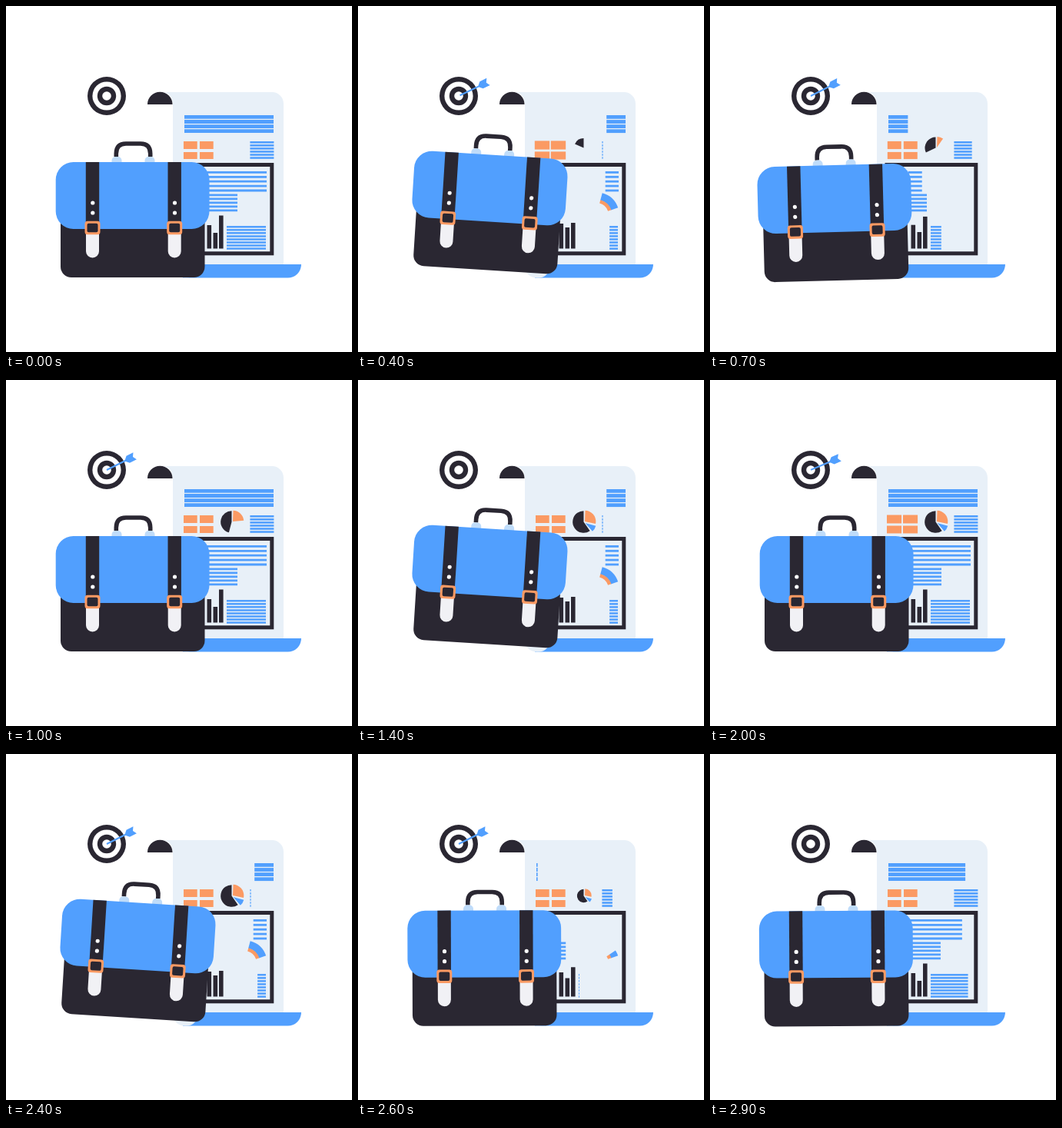
These frames come from a looping animation (450x450 px, 3 s). An HTML page with a canvas:

```html
<!DOCTYPE html>
<html lang="en">
<head>
<meta charset="utf-8">
<title>Briefcase and report</title>
<style>
  html, body { margin: 0; width: 100%; height: 100%; overflow: hidden; background: #fff; }
  canvas { display: block; }
</style>
</head>
<body>
<canvas id="stage" width="450" height="450"></canvas>
<script>
const ctx = document.getElementById('stage').getContext('2d');
const BLUE = '#519ffe', DARK = '#2a2732', PAPER = '#e8f0f8', ORANGE = '#fb9a63', WHITE = '#fff';
const LOOP = 3000, STEP = 100;

const rad = deg => deg * Math.PI / 180;
const mix = (a, b, k) => a + (b - a) * k;
const progress = (t, from, to) => Math.min(1, Math.max(0, (t - from) / (to - from)));
const ease = (t, from, to) => { const p = progress(t, from, to); return p * p * (3 - 2 * p); };

function fill(color, path) {
  ctx.fillStyle = color;
  ctx.fill(new Path2D(path));
}
function box(color, x, y, w, h, r = 0) {
  ctx.fillStyle = color;
  ctx.beginPath();
  ctx.roundRect(x, y, w, h, r);
  ctx.fill();
}
function sector(color, x, y, r, from, to, inner = 0) {
  if (to - from < 0.5) return;
  ctx.fillStyle = color;
  ctx.beginPath();
  ctx.arc(x, y, r, rad(from), rad(to));
  ctx.arc(x, y, inner, rad(to), rad(from), true);
  ctx.fill();
}
const disc = (color, x, y, r) => sector(color, x, y, r, 0, 360);

function lines(left, right, top, count, pitch, height) {
  if (right - left < 0.5) return;
  for (let i = 0; i < count; i++) box(BLUE, left, top + i * pitch, right - left, height);
}
// Text rows are erased towards the right, then written again from the left.
function wipedLines(u, left, right, erased, written, ...rows) {
  if (u < erased) lines(mix(left, right, ease(u, 0, erased)), right, ...rows);
  else lines(left, mix(left, right, ease(u, erased, written)), ...rows);
}

function drawTarget() {
  for (let i = 0; i < 4; i++) disc(i % 2 ? WHITE : DARK, 131, 117, 25 - 6.4 * i);
}

function drawArrow(t) {
  const c = t < 1550 ? t : t - 1550;
  if (c < 170) return;
  const flight = 38 * (1 - progress(c, 145, 470)) ** 2;
  const since = Math.max(0, c - 300);
  const wobble = -5.5 * Math.exp(-since / 350) * Math.sin(2 * Math.PI * since / 190) * (1 - progress(c, 600, 800));
  ctx.save();
  ctx.globalAlpha = 1 - progress(c, 1100, 1300);
  ctx.translate(131, 117);
  ctx.rotate(rad(wobble - 26.5));
  ctx.translate(flight, 0);
  fill(BLUE, 'M0 -1H28V1H0Z M26 0L31 -5H41L38 0L41 5H31Z');
  ctx.restore();
}

function drawPie(t) {
  const r = mix(12.5, 14.3, ease(t, 400, 800)) * (1 - ease(t, 2450, 2800));
  if (r <= 0) return;
  sector(DARK, 293.5, 184.5, r, -90 - 215 * progress(t, 0, 1300), -90);
  sector(ORANGE, 295, 184, r, -88, -88 + 100 * progress(t, 500, 1100));
  sector(BLUE, 295.5, 186, r, 15, 15 + 34 * progress(t, 1050, 1350));
}

function drawTiles(t) {
  const pulse = 1.2 * Math.exp(-(((t % 1500 - 400) / 220) ** 2));
  for (let col = 0; col < 2; col++)
    for (let row = 0; row < 2; row++)
      box(ORANGE, 231 + 21 * col - pulse, 176 + 14 * row - pulse / 2, 17.7 + pulse * 1.4, 10 - row + pulse);
}

function drawFan(u) {
  const from = mix(-75, -19, ease(u, 400, 700)), to = mix(-75, -19, ease(u, 100, 400));
  sector(BLUE, 310, 272, 29.8, from, to, 20);
  sector(ORANGE, 310, 272, 20.5, from, to, 16);
}

function drawBars(u) {
  const lift = Math.sin(Math.PI * progress(u, 0, 800)) ** 2;
  const bar = (x, rest, raised) => {
    const top = mix(rest, raised, lift);
    box(DARK, x, top, 5.6, 315.5 - top);
  };
  bar(261.5, 285, 283);
  bar(269.5, 295, 288);
  bar(277, 272.5, 282);
}

function drawReport(t) {
  const u = t % 1000;
  fill(BLUE, 'M230 336H384A17.5 17.5 0 0 1 366.5 353.6H230Z');
  fill(PAPER, 'M202 112H346A15 15 0 0 1 361 127V336H250Q249 353.6 234 353.6Q217 353.6 217 336V130Q217 112 202 112Z');
  fill(DARK, 'M184 128A16 16 0 0 1 216.5 128Z');

  wipedLines(u, 232, 348, 570, 1000, 142, 4, 6.1, 4.8);
  const small = 1 - ease(u, 0, 410) + ease(u, 390, 850);
  lines(317.4, 317.4 + Math.max(1.2, 31 * small), 176, 6, 4.05, 2.6);
  drawTiles(t);
  drawPie(t);

  ctx.strokeStyle = DARK;
  ctx.lineWidth = 5;
  ctx.strokeRect(230, 206.5, 115.8, 115.3);
  wipedLines(u, 258, 339, 570, 1000, 215, 5, 5.9, 2.8);
  wipedLines(u, 257, 301, 400, 950, 244.5, 5, 5, 2.8);
  wipedLines(u, 287, 338, 570, 950, 286, 8, 4.05, 2.5);
  drawFan(u);
  drawBars(u);
}

function drawStrap(x) {
  box(DARK, x - 8.7, 203, 17.4, 82);
  for (const y of [256, 269]) disc(WHITE, x + 0.3, y, 2.6);
  box('#f1f1f5', x - 8.5, 290, 17, 37.5, [0, 0, 8.5, 8.5]);
  box(ORANGE, x - 10, 279.8, 20, 17.5, 3.5);
  box(DARK, x - 7, 282.8, 14, 11.5, 2);
}

function drawBag(u) {
  const tilt = 3.6 * ease(u, 0, 400) - 5.1 * ease(u, 400, 700) + 1.5 * ease(u, 700, 1000);
  ctx.save();
  ctx.translate(319, 351);
  ctx.rotate(rad(tilt));
  ctx.translate(-319, -351);
  ctx.strokeStyle = DARK;
  ctx.lineWidth = 5.6;
  ctx.stroke(new Path2D('M143.3 196V192Q143.3 179 156 179H175Q187.7 179 187.7 192V196'));
  for (const x of [144, 187]) box('#bfdcfa', x - 6.5, 196, 13, 8, [5, 5, 0, 0]);
  box(DARK, 71, 270, 187.5, 83, [0, 0, 14, 14]);
  box(BLUE, 64.7, 203, 199.8, 87, 23);
  drawStrap(112.5);
  drawStrap(219.2);
  ctx.restore();
}

function draw() {
  const t = Math.floor(performance.now() % LOOP / STEP) * STEP;
  ctx.fillStyle = WHITE;
  ctx.fillRect(0, 0, 450, 450);
  drawTarget();
  drawArrow(t);
  drawReport(t);
  drawBag(t % 1000);
  requestAnimationFrame(draw);
}
draw();
</script>
</body>
</html>
```
